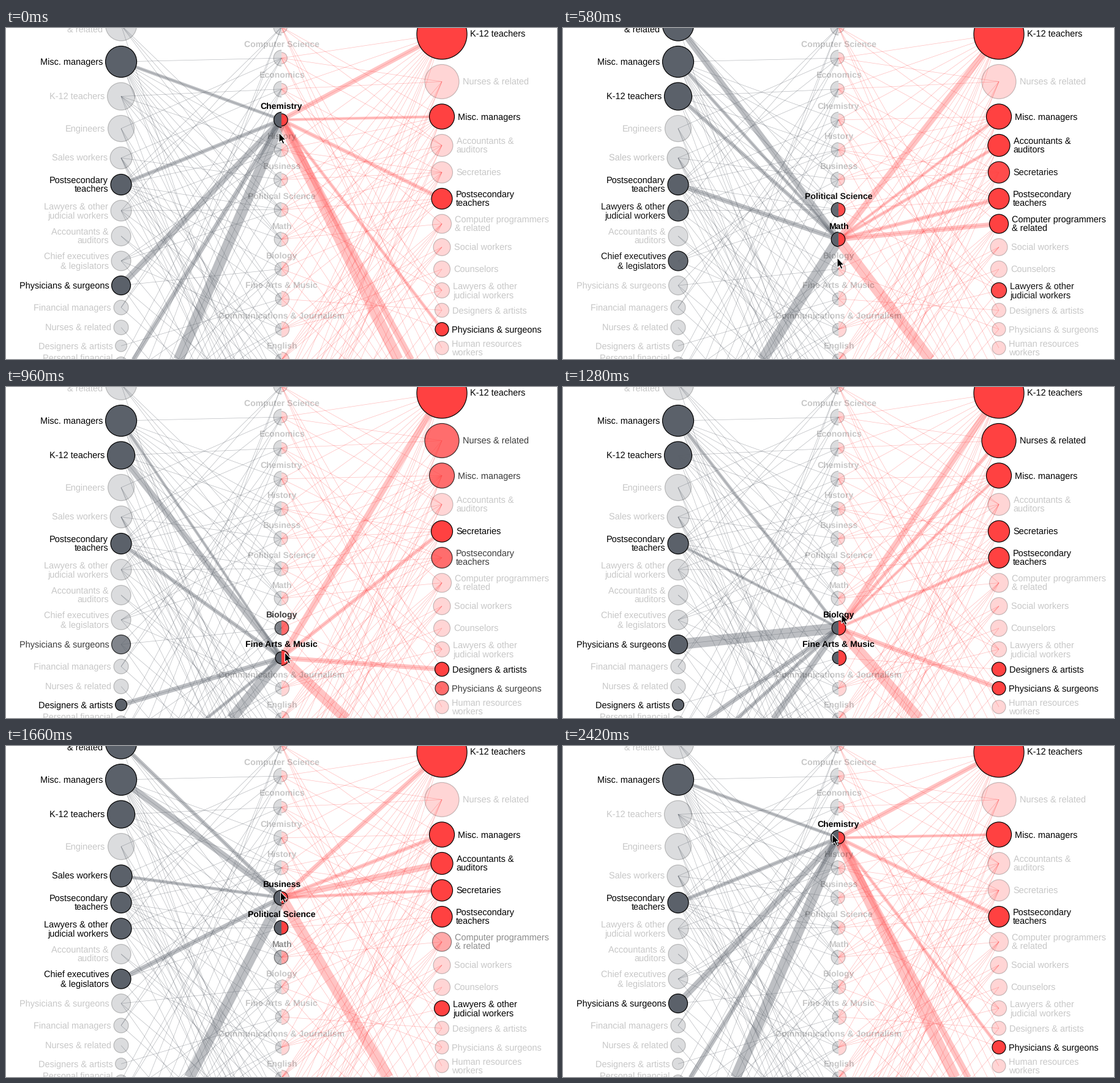
A matplotlib script for the animation above (2.44 s loop, 900 px wide and 540 px high).

```python
import numpy as np
import matplotlib.pyplot as plt
from matplotlib.animation import FuncAnimation
from matplotlib.collections import LineCollection
from matplotlib.colors import to_rgba
from matplotlib.patches import Circle, PathPatch, Polygon
from matplotlib.path import Path

W, H, DPI = 900, 540, 72      # at 72 dpi one point is one pixel
STEP, FRAMES = 20, 122
SLATE, RED = "#5b616a", "#ff4141"
LEFT_X, MID_X, RIGHT_X = 188, 450, 712
DIM = 0.22                    # opacity of parts that are not highlighted
LAG, HOLD, FADE = 25, 75, 250  # ms

plt.rcParams["font.family"] = "Liberation Sans"
plt.rcParams["text.hinting"] = "none"
rng = np.random.default_rng(4)

# Label and radius, from top to bottom; single letters lie below the stage
LEFT = [
    ("\n& related", 25.5), ("Misc. managers", 25.5), ("K-12 teachers", 22.5),
    ("Engineers", 21.5), ("Sales workers", 18), ("Postsecondary\nteachers", 17),
    ("Lawyers & other\njudicial workers", 17), ("Accountants &\nauditors", 16),
    ("Chief executives\n& legislators", 16), ("Physicians & surgeons", 15.5),
    ("Financial managers", 12), ("Nurses & related", 12),
    ("Designers & artists", 9.5), ("Personal financial\nadvisors", 10),
] + [(name, 9) for name in "abcdefgh"]
RIGHT = [
    ("K-12 teachers", 41), ("Nurses & related", 28), ("Misc. managers", 20.5),
    ("Accountants &\nauditors", 18), ("Secretaries", 17.5),
    ("Postsecondary\nteachers", 17), ("Computer programmers\n& related", 15.5),
    ("Social workers", 14), ("Counselors", 13.5),
    ("Lawyers & other\njudicial workers", 12.5), ("Designers & artists", 11.5),
    ("Physicians & surgeons", 11), ("Human resources\nworkers", 11),
] + [(name, 9.5) for name in "abcdef"]

# Label and share of the left half
MAJORS = [
    ("", 0.66), ("Computer Science", 0.66), ("Economics", 0.66),
    ("Chemistry", 0.61), ("History", 0.54), ("Business", 0.61),
    ("Political Science", 0.55), ("Math", 0.55), ("Biology", 0.46),
    ("Fine Arts & Music", 0.39), ("Communications & Journalism", 0.38),
    ("English", 0.38),
] + [("", 0.4)] * 6

# First words of the linked labels on each side, widest link first
LINKS = {
    "Chemistry": ("h Physicians a Postsecondary Misc.",
                  "f d K-12 Postsecondary Physicians Misc."),
    "History": ("h Lawyers K-12 Postsecondary Misc. Chief",
                "f K-12 Lawyers Postsecondary Secretaries Misc."),
    "Business": ("h Misc. Chief & Sales",
                 "f Accountants K-12 Misc. Secretaries"),
    "Political Science": ("h Lawyers Misc. Chief & K-12 Postsecondary",
                          "f Lawyers K-12 Misc. Secretaries Postsecondary"),
    "Math": ("h & Postsecondary K-12 Misc.",
             "f K-12 Computer Postsecondary Accountants Misc."),
    "Biology": ("Physicians h a c Misc. Postsecondary",
                "f K-12 Physicians Nurses Postsecondary Misc."),
    "Fine Arts & Music": ("h K-12 Designers Postsecondary d Misc.",
                          "f K-12 Designers Secretaries"),
}

# Key points of the pointer: time, x, y
POINTER = np.array([
    (0, 446, 171), (580, 448, 375), (800, 454, 426), (960, 455.5, 433),
    (1140, 457, 428), (1280, 455, 370), (1660, 448.5, 238),
    (1960, 443, 174.5), (2420, 440, 144)])
ARROW = np.array([(0, 0), (0, 16), (3.6, 12.6), (6.2, 18.2), (8.8, 17),
                  (6.3, 11.6), (11, 11.6)])


def stack(first, radii, gap):
    """Centres of circles piled up with a constant gap."""
    radii = np.array(radii)
    return first + np.append(0, np.cumsum(radii[:-1] + radii[1:] + gap))


def half_radii(share):
    return 16 * np.sqrt(share), 16 * np.sqrt(1 - share)


def find(word, nodes):
    return next(i for i, (label, _) in enumerate(nodes)
                if label.split()[0] == word)


def pick_links(label, side, nodes):
    """Node indices, widest link first; minor majors get random ones."""
    if label in LINKS:
        return [find(word, nodes) for word in LINKS[label][side].split()]
    weights = 0.88 ** np.arange(len(nodes))
    return list(rng.choice(len(nodes), 5, replace=False,
                           p=weights / weights.sum()))


left_y = stack(-4.5, [r for _, r in LEFT], 8.5)
right_y = stack(10, [r for _, r in RIGHT], 8.5)
major_y = stack(-1.5, [max(half_radii(s)) for _, s in MAJORS], 24.6)
left_links = [pick_links(label, 0, LEFT) for label, _ in MAJORS]
right_links = [pick_links(label, 1, RIGHT) for label, _ in MAJORS]


def pointer_at(t):
    times, xs, ys = POINTER.T
    return np.array([np.interp(t, times, xs), np.interp(t, times, ys)])


def hovered_at(t):
    return int(np.argmin(abs(major_y - pointer_at(t - LAG)[1])))


hovers = np.array([hovered_at(f * STEP) for f in range(FRAMES)])

fig = plt.figure(figsize=(W / DPI, H / DPI), dpi=DPI, facecolor="white")
ax = fig.add_axes([0, 0, 1, 1])
ax.set_xlim(0, W)
ax.set_ylim(H, 0)
ax.axis("off")


def links(major, slate_alpha, red_alpha):
    """Segments, widths and colours of one major's links."""
    segs, widths, colors = [], [], []
    start = (MID_X, major_y[major])
    for x, ys, ids, color in (
            (LEFT_X, left_y, left_links[major], to_rgba(SLATE, slate_alpha)),
            (RIGHT_X, right_y, right_links[major], to_rgba(RED, red_alpha))):
        for rank, i in enumerate(ids):
            segs.append([start, (x, ys[i])])
            widths.append(17.5 / (rank + 1) ** 0.75)
            colors.append(color)
    return segs, widths, colors


def add_text(x, y, text, align, **style):
    return ax.text(x, y, text, ha=align, va="baseline", color="black",
                   zorder=5, **style)


def add_node(x, y, label, r, color, side):
    parts = [ax.add_patch(Circle((x, y), r, fc=color, ec="black", lw=1.2,
                                 zorder=3))]
    lines = label.split("\n")
    for i, line in enumerate(lines):
        base = y + 5 + 15 * (i - (len(lines) - 1) / 2)
        gap = r + (4 if side < 0 else 5.5)
        parts.append(add_text(x + side * gap, base, line,
                              "right" if side < 0 else "left", fontsize=14.5))
    return parts


def add_half(y, r, start, color):
    arc = Path.arc(start, start + 180)
    path = Path(arc.vertices * r + (MID_X, y), arc.codes)
    return ax.add_patch(PathPatch(path, fc=color, ec="black", lw=1.2, zorder=4))


def add_major(y, label, share):
    r_left, r_right = half_radii(share)
    base = y - max(r_left, r_right) - 5.5
    return [add_half(y, r_left, 90, SLATE), add_half(y, r_right, -90, RED),
            add_text(MID_X, base, label, "center", fontsize=14,
                     fontweight="bold")]


for m in range(len(MAJORS)):
    segs, _, colors = links(m, 0.42, 0.34)
    ax.add_collection(LineCollection(segs, colors=colors, linewidths=0.7,
                                     zorder=1))
bands = ax.add_collection(LineCollection([], zorder=2))

left_parts = [add_node(LEFT_X, y, *node, SLATE, -1)
              for y, node in zip(left_y, LEFT)]
right_parts = [add_node(RIGHT_X, y, *node, RED, 1)
               for y, node in zip(right_y, RIGHT)]
major_parts = [add_major(y, *major) for y, major in zip(major_y, MAJORS)]
pointer = ax.add_patch(Polygon(ARROW, fc="black", ec="white", lw=1, zorder=9))


def ease(u):
    u = min(max(u, 0), 1)
    return 4 * u ** 3 if u < 0.5 else 1 - 4 * (1 - u) ** 3


def glow(major, frame):
    """Highlight lights at once, then lingers and fades."""
    seen = np.flatnonzero(hovers[:frame + 1] == major)
    if not seen.size:
        return 0
    idle = (frame - seen[-1]) * STEP
    return 1 - ease((idle - HOLD) / FADE)


def set_level(parts, level):
    for part in parts:
        part.set_alpha(DIM + (1 - DIM) * level)


def draw(frame):
    glows = [glow(m, frame) for m in range(len(MAJORS))]
    for parts, level in zip(major_parts, glows):
        set_level(parts, level)
    for nodes, ends in ((left_parts, left_links), (right_parts, right_links)):
        for i, parts in enumerate(nodes):
            set_level(parts, max([g for g, ids in zip(glows, ends) if i in ids],
                                 default=0))

    segs, widths, colors = links(hovers[frame], 0.4, 0.31)
    bands.set_segments(segs)
    bands.set_linewidths(widths)
    bands.set_color(colors)
    pointer.set_xy(ARROW + pointer_at(frame * STEP))
    return []


anim = FuncAnimation(fig, draw, frames=FRAMES, interval=STEP, repeat=True,
                     repeat_delay=0, init_func=lambda: draw(0))
plt.show()
```
